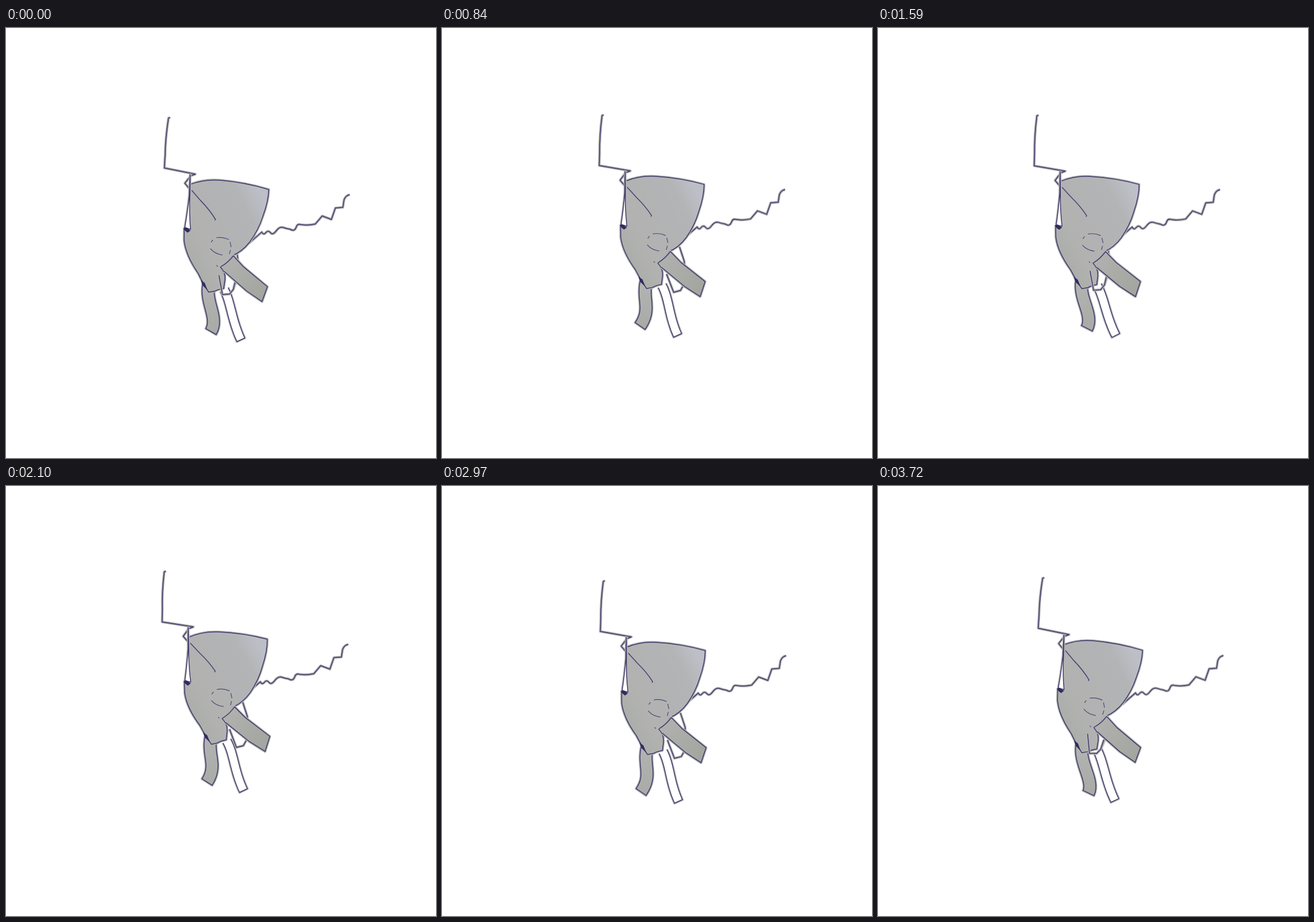
Animation, 748 px wide and 748 px high, one loop 3.75 s. Source, as an HTML page with a canvas:

```html
<!DOCTYPE html>
<html lang="en">
<head>
<meta charset="utf-8">
<title>Walking paper puppet</title>
<style>
  html, body { margin: 0; width: 100%; height: 100%; overflow: hidden; background: #fff; }
  canvas { display: block; width: 748px; height: 748px; }
</style>
</head>
<body>
<canvas width="748" height="748"></canvas>
<script>
const ctx = document.querySelector('canvas').getContext('2d');
const LOOP = 3750, STEP = 30, BOUNCE = 560;
const CORNER = [457, 272]; // upper right corner of the body, the anchor of the whole puppet
const TURNS = [-450, 280, 840, 1400, 2030, 2360, 2930, 3720]; // times at which the limbs reverse

const shapes = {
  body: 'M320 265 Q345 255 372 257 Q415 260 457 272 Q457 292 447 320 Q440 343 425 364 Q412 381 395 388 ' +
        'Q387 399 375 408 Q384 417 383 430 L381 445 Q370 447 366 450 L355 452 Q346 439 336 419 ' +
        'Q314 388 311 362 L311 343 L322 343 Q319 310 321 275 Z',
  rod: 'M284 149 L281 150 Q276 185 276 215 L275 237 L329 247 L321 250 L311 263 L321 275',
  sliver: 'M320 248 L319 285 Q316 315 312 340 L322 343 Q319 315 320 280 Z',
  chin: 'M309 341 L314 340 L322 345 L317 349 L313 346 Z M341 431 L348 436 L353 449 L344 440 Z',
  mouth: 'M323 275 L339 293 Q355 309 365 325 L364 327',
  eye: 'M367 357 Q378 355 389 360 M391 364 L393 373 M392 378 L390 385 M361 361 L358 365 ' +
       'M357 376 Q364 385 378 387 M368 405 L370 407',
  limb: 'M376 407 Q388 400 397 388 L415 407 L457 441 L448 467 L421 449 L381 415',
  sleeve: 'M419 447 Q423 425 421 405 L413 380',
  hand: 'M390 427 L402 459 L414 456 L419 447 L420 430',
  tail: 'M422 366 L445 346 Q448 352 452 347 T460 347 T470 344 T482 338 T494 341 Q502 346 505 337 ' +
        'Q507 331 513 333 Q525 335 538 332 L550 318 L566 324 L573 304 L586 303 L588 290 Q591 282 598 281'
};
for (const name in shapes) shapes[name] = new Path2D(shapes[name]);

const mix = (a, b, u) => a + (b - a) * u;
const ease = u => (1 - Math.cos(Math.PI * u)) / 2;

// 0 with the hand forward, 1 with the hand back
function swingAt(t) {
  const i = TURNS.findIndex(turn => turn >= t);
  const u = ease((t - TURNS[i - 1]) / (TURNS[i] - TURNS[i - 1]));
  return i % 2 ? u : 1 - u;
}

function poseAt(t) {
  const u = t / LOOP, sway = Math.cos(2 * Math.PI * u);
  const calm = ((1 + sway) / 2) ** 4; // the bounce fades near the ends of the loop
  const bounce = 13.5 * Math.cos(2 * Math.PI * (t - 930) / BOUNCE);
  const swing = swingAt(t);
  return {
    swing,
    x: 454.8 + 2.2 * sway + 3 * u,
    y: 278 + calm * (3 + 5 * u) - (1 - calm) * bounce,
    tilt: .9 * sway + swing - .8
  };
}

function gradient(x0, y0, x1, y1, ...colors) {
  const g = ctx.createLinearGradient(x0, y0, x1, y1);
  colors.forEach((c, i) => g.addColorStop(i / (colors.length - 1), c));
  return g;
}
const bodyFill = gradient(315, 390, 460, 315, '#abada9', '#b1b2b0', '#b2b2b2', '#b2b3b4', '#b3b4b6', '#bcbfc6');
const limbFill = gradient(385, 400, 452, 455, '#b0b1ae', '#a3a59f');
const legFill = gradient(345, 440, 355, 525, '#b3b4b2', '#a8aaa6');

function stroke(path, color, width) {
  ctx.strokeStyle = color;
  ctx.lineWidth = width;
  ctx.stroke(path);
}

function ink(path, fill) {
  stroke(path, '#b5b4b6', 4.6);
  if (fill) {
    ctx.fillStyle = fill;
    ctx.fill(path);
  }
  stroke(path, '#3d3868', 1.5);
}

function turned(degrees, [x, y], draw) {
  ctx.save();
  ctx.translate(x, y);
  ctx.rotate(degrees * Math.PI / 180);
  ctx.translate(-x, -y);
  draw();
  ctx.restore();
}

// Strip of constant width along a cubic Bezier curve
function ribbon(a, b, c, d, width) {
  const left = [], right = [];
  for (let i = 0; i <= 16; i++) {
    const v = i / 16, w = 1 - v;
    const [x, y] = [0, 1].map(k => w ** 3 * a[k] + 3 * w * w * v * b[k] + 3 * w * v * v * c[k] + v ** 3 * d[k]);
    const [dx, dy] = [0, 1].map(k => w * w * (b[k] - a[k]) + 2 * w * v * (c[k] - b[k]) + v * v * (d[k] - c[k]));
    const r = width / 2 / Math.hypot(dx, dy);
    left.push([x - dy * r, y + dx * r]);
    right.unshift([x + dy * r, y - dx * r]);
  }
  const path = new Path2D();
  left.concat(right).forEach(p => path.lineTo(...p));
  return path;
}

function drawPuppet(s) {
  const farLeg = ribbon([382, 447], [394, 470], [393 + 4 * s, 500], [408 + 6 * s, 534], 15);
  const nearLeg = ribbon([355, 438], [mix(346, 350, s), 470], [mix(364, 378, s), mix(487, 500, s)],
                         [mix(343, 368, s), mix(517, 522, s)], 21);
  const swingArm = path => turned(14 * s, [410, 319], () => ink(path));
  ink(farLeg, '#fff');
  ink(nearLeg, legFill);
  swingArm(shapes.sleeve);
  ink(shapes.rod);
  ink(shapes.body, bodyFill);
  ink(shapes.sliver, '#fff');
  ctx.fillStyle = '#302b60';
  ctx.fill(shapes.chin);
  stroke(shapes.mouth, '#454071', 1.5);
  stroke(shapes.eye, '#4b4870', 1.2);
  swingArm(shapes.hand);
  ink(shapes.limb, limbFill);
}

function frame() {
  const t = Math.floor(performance.now() % LOOP / STEP) * STEP;
  const { x, y, tilt, swing } = poseAt(t);
  ctx.fillStyle = '#fff';
  ctx.fillRect(0, 0, 748, 748);
  ctx.lineJoin = 'round';
  ctx.save();
  ctx.translate(x - CORNER[0], y - CORNER[1]);
  ink(shapes.tail);
  turned(tilt, CORNER, () => drawPuppet(swing));
  ctx.restore();
  requestAnimationFrame(frame);
}
frame();
</script>
</body>
</html>
```
